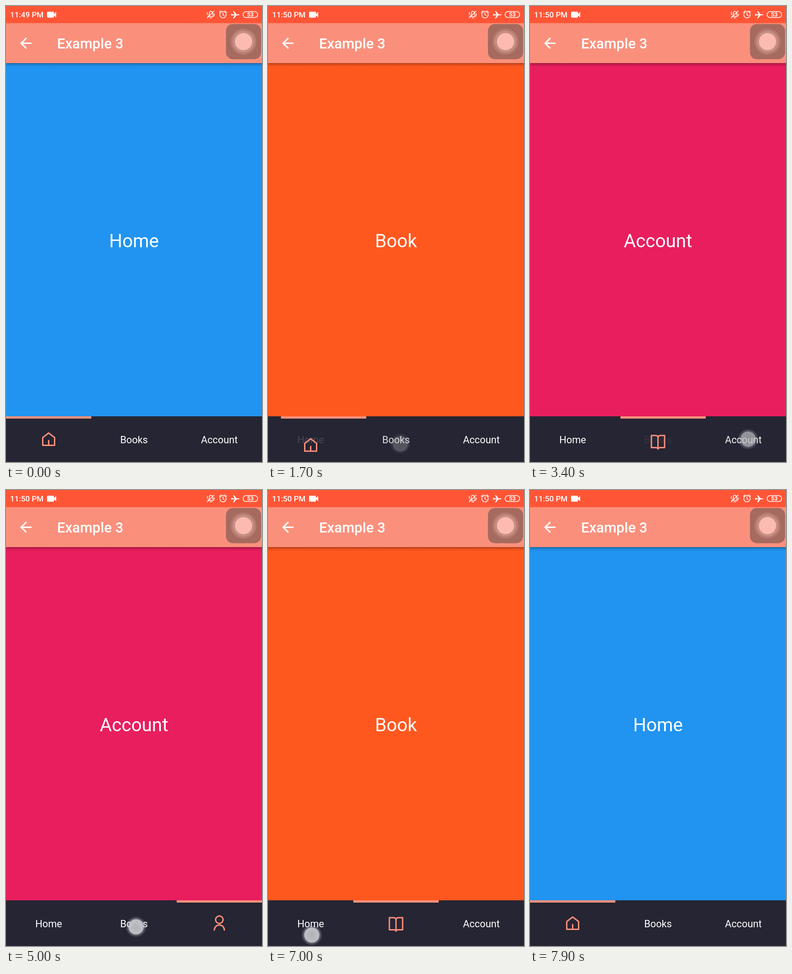
An HTML page that plays this animation: 561x998 px, repeating every 8000 ms.

```html
<!DOCTYPE html>
<html lang="en">
<head>
<meta charset="utf-8">
<title>Bottom navigation</title>
<style>
  html, body { margin: 0; width: 100%; height: 100%; overflow: hidden; background: #262533; }
  svg { display: block; width: 100vw; height: 100vh; font-family: Roboto, sans-serif; }
  text { fill: #fff; }
  .page { font-size: 40.5px; text-anchor: middle; }
  .label { font-size: 21.8px; text-anchor: middle; }
  .icon { fill: none; stroke: #fa907c; stroke-width: 3; stroke-linecap: round; stroke-linejoin: round; }
  .status { fill: none; stroke: #fff; stroke-width: 1.6; stroke-linecap: round; stroke-linejoin: round; }
</style>
</head>
<body>
<svg viewBox="0 0 561 998">
  <defs>
    <linearGradient id="shade" x2="0" y2="1">
      <stop stop-color="#000" stop-opacity=".38"/>
      <stop offset=".4" stop-color="#000" stop-opacity=".13"/>
      <stop offset="1" stop-color="#000" stop-opacity="0"/>
    </linearGradient>
    <radialGradient id="glow">
      <stop offset=".62" stop-color="#c9d3e6" stop-opacity=".6"/>
      <stop offset="1" stop-color="#c9d3e6" stop-opacity="0"/>
    </radialGradient>
    <radialGradient id="dot">
      <stop stop-color="#b4b4b8"/>
      <stop offset="1" stop-color="#c6c6ca"/>
    </radialGradient>
  </defs>

  <rect id="screen" y="124" width="561" height="775"/>
  <text id="title" class="page" x="280.5" y="527.5"></text>
  <rect y="124.5" width="561" height="9" fill="url(#shade)"/>

  <rect width="561" height="38" fill="#ff5537"/>
  <rect y="37.5" width="561" height="87.5" fill="#fa907c"/>

  <text id="clock" x="9" y="25" font-size="17" font-weight="500"></text>
  <path d="M91.5 12.5h12q1.5 0 1.5 1.5v3.5l5-4.5v12l-5-4.5v3.500q0 1.500-1.500 1.500h-12q-1.500 0-1.500-1.500v-10q0-1.500 1.500-1.500z" fill="#fff"/>
  <g class="status">
    <path d="M442 23h12.500M444 22.500q1.500-2 1.500-6.500 0-4 3.500-4.500 4 .5 4 5 0 4 1.500 6M447 26h4M441 26l15-15M441.500 14q-1.500 2.500 0 5M456 17q1.200 2 0 4"/>
    <circle cx="475.500" cy="19" r="7"/>
    <path d="M475.500 15v4.500l3 1.500M467.500 14l4-3.500M483.500 14l-4-3.500"/>
    <rect x="519.500" y="12.300" width="32" height="13" rx="6.500"/>
  </g>
  <path d="M493 17l2 .2 2 1h4l-3.500-7h2l6 7h4q2 .1 2 1t-2 1h-4l-6 7h-2l3.500-7h-4l-2 1-2 .2 1-2.200z" fill="#fff"/>
  <text x="535.500" y="23.300" font-size="12.500" font-weight="700" text-anchor="middle">53</text>

  <path transform="translate(24.800 62.800) scale(1.558)" fill="#fff"
    d="M20 11H7.830l5.590-5.590L12 4l-8 8 8 8 1.410-1.410L7.830 13H20z"/>
  <text x="112" y="93" font-size="31.200" font-weight="500">Example 3</text>

  <rect x="482" y="39.500" width="77" height="77" rx="15" fill="#a66a5f"/>
  <circle cx="520.500" cy="78" r="28.500" fill="#b57b71"/>
  <circle cx="520.500" cy="78" r="24" fill="#c68e84"/>
  <circle cx="520.500" cy="78" r="18.800" fill="#fdbab0"/>

  <rect y="898" width="561" height="100" fill="#262533"/>
  <g id="labels">
    <text class="label" x="93.500" y="956.500">Home</text>
    <text class="label" x="280.500" y="956.500">Books</text>
    <text class="label" x="467.500" y="956.500">Account</text>
  </g>
  <g id="icons" class="icon">
    <path d="M80.500 944.500L93.500 934.500 106.500 944.500V961.500H80.500zM93.500 951v10"/>
    <path d="M266 936h9q5 0 5.500 4.500 .5-4.500 5.500-4.500h9v26.500h-10q-4 0-4.500 3 -.5-3-4.500-3h-10zM280.500 940v25"/>
    <path d="M456.500 963a11 11 0 0 1 22 0M475.700 940.500a8.200 8.200 0 1 1-16.400 0a8.200 8.200 0 1 1 16.400 0"/>
  </g>
  <rect id="bar" y="898" width="187" height="5" fill="#fa907c"/>

  <g id="touch">
    <circle r="23" fill="url(#glow)"/>
    <circle r="16.500" fill="url(#dot)" opacity=".9"/>
  </g>
</svg>
<script>
  const LOOP = 8000, SLIDE = 270, TAB = 187, DROP = 146, CLOCK_TICK = 900;
  const PRESS = 170, RELEASE = 60;
  const pages = [
    { name: 'Home', color: '#2094f0' },
    { name: 'Book', color: '#ff581f' },
    { name: 'Account', color: '#e81e5e' }
  ];
  const taps = [
    { at: 1660, from: 0, to: 1, x: 290, y: 958 },
    { at: 3385, from: 1, to: 2, x: 478, y: 948 },
    { at: 5060, from: 2, to: 1, x: 285, y: 956 },
    { at: 7060, from: 1, to: 0, x: 96, y: 974 }
  ];
  const get = id => document.getElementById(id);
  const [screen, title, clock, bar, touch] = ['screen', 'title', 'clock', 'bar', 'touch'].map(get);
  const labels = [...get('labels').children];
  const icons = [...get('icons').children];
  const clamp = v => Math.min(1, Math.max(0, v));

  // Near-linear slide with softened ends
  const soften = p => p - 0.09 * Math.sin(2 * Math.PI * p) * Math.abs(Math.cos(Math.PI * p));

  function draw(t) {
    const last = taps.filter(tap => tap.at <= t).pop() || { at: -SLIDE, from: 0, to: 0 };
    const p = clamp((t - last.at) / SLIDE);
    const page = pages[last.to];

    screen.setAttribute('fill', page.color);
    title.textContent = page.name;
    clock.textContent = t < CLOCK_TICK ? '11:49 PM' : '11:50 PM';
    bar.setAttribute('x', TAB * (last.from + (last.to - last.from) * p));

    pages.forEach((_, i) => {
      const shown = i === last.to ? (last.from === last.to ? 1 : p) : i === last.from ? 1 - p : 0;
      labels[i].setAttribute('opacity', 1 - shown);
      icons[i].setAttribute('transform', `translate(0 ${DROP * (1 - soften(shown))})`);
    });

    const tap = taps.find(({ at }) => t >= at - PRESS && t < at + RELEASE);
    touch.setAttribute('opacity', tap
      ? clamp((t - tap.at + PRESS) / 20) * clamp((tap.at + RELEASE - t) / RELEASE)
      : 0);
    if (tap) touch.setAttribute('transform', `translate(${tap.x} ${tap.y})`);
  }

  const start = performance.now();
  function tick() {
    draw((performance.now() - start) % LOOP);
    requestAnimationFrame(tick);
  }
  tick();
</script>
</body>
</html>
```
